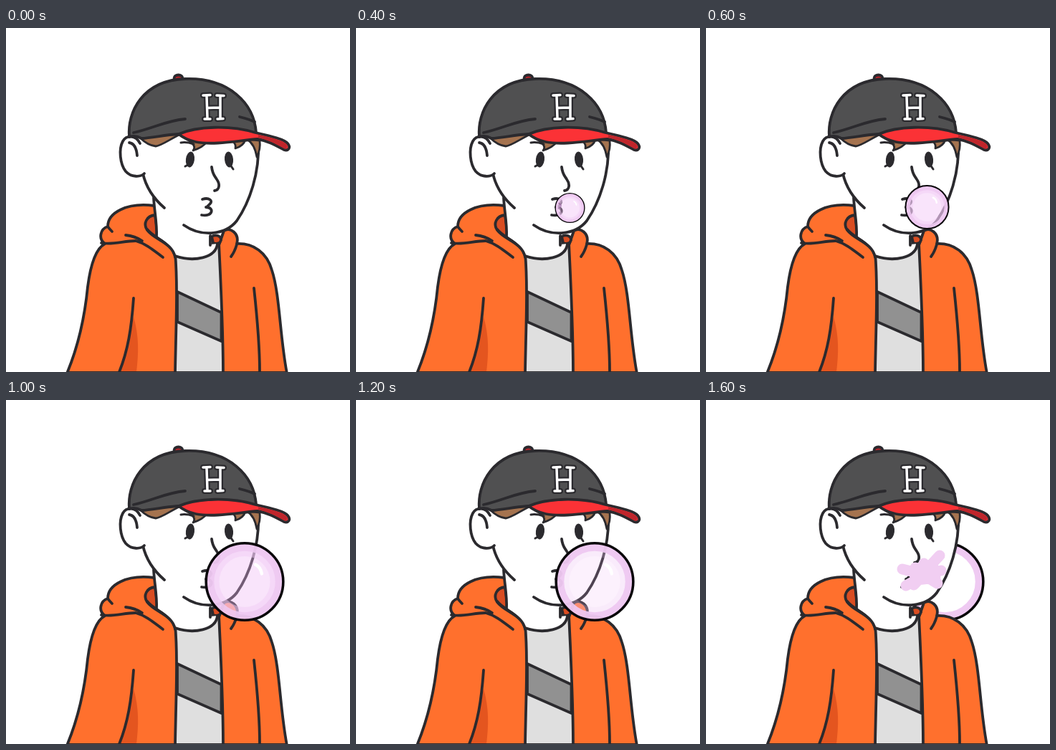
These frames come from a looping animation (480x480 px, 1.8 s). An HTML page:

```html
<!DOCTYPE html>
<html lang="en">
<head>
<meta charset="utf-8">
<title>Bubble gum</title>
<style>
  html, body { margin: 0; width: 100%; height: 100%; overflow: hidden; background: #fff; }
  svg { display: block; width: 100vw; height: 100vh; }
  .line { fill: none; }
  .ink { fill: #2b2a2e; stroke: none; }
  .orange { fill: #ff702d; }
  .rust { fill: #d94d22; }
  .hair { fill: #a5734f; stroke-width: 2.8; }
  .white { fill: #fff; }
  .flat { stroke: none; }
</style>
</head>
<body>
<svg viewBox="0 0 480 480" stroke="#2b2a2e" stroke-width="3.8" stroke-linecap="round" stroke-linejoin="round">
  <defs>
    <g id="ring">
      <circle r=".87" fill="none" stroke="#efc8f2" stroke-width=".2" stroke-opacity=".96"/>
      <circle r=".97" fill="none" stroke="#09070a" stroke-width=".064"/>
    </g>
    <path id="letter" d="M275 94L285 93.500M294 94L304 94.500M277 127L285 127M295 127L303 126.500M280 95L281 126M299 95L299 126M281 111.500L299 111"/>
  </defs>

  <use id="back" href="#ring"/>

  <!-- hoodie -->
  <path class="orange" d="M85 482C100 446 110 402 114 361C118 330 125 308 138 301C128 294 132 280 142 277C142 258 168 243 207 248L236 318L297 303L304 283C313 277 326 287 322 301C345 300 364 313 371 338C382 371 382 430 392 482Z"/>
  <path class="flat" d="M178 403C186 430 185 455 182 480H158C169 452 174 428 178 403Z" fill="#e4551f"/>
  <path class="line" d="M178 377C175 420 170 450 158 480M346 363C350 400 354 440 354 480"/>
  <path class="rust" d="M208 261C196 262 191 273 197 282C204 292 220 297 229 306L212 290Z"/>
  <path class="rust" d="M287 291C292 288 300 289 300 296L297 302L289 300Z"/>

  <!-- shirt -->
  <path d="M236 314C240 360 237 420 236 482H303C303 420 300 360 297 300Z" fill="#dfdfdf"/>
  <path d="M239 368L300.500 397V437L239 410Z" fill="#919191"/>

  <!-- neck -->
  <path class="white flat" d="M206 235L210 290C222 297 233 305 236 318C262 327 292 321 295 301L285 302V270Z"/>
  <path class="line" d="M206 237C207 256 211 273 210 291M285 290V303M236 318C262 327 293 321 295 301"/>
  <path class="line" d="M197 281C207 294 233 301 236 320M133 300C150 303 164 297 181 297C196 301 208 312 219 320M167 289C176 290 184 293 190 297M142 277C144 280 146 282 148 284M322 302C320 309 317 315 314 319"/>

  <!-- head -->
  <path class="white flat" d="M190 152L191 203C196 221 207 238 221 251L248 275C274 292 307 287 322 269C340 243 354 202 352 160L330 140Z"/>
  <path class="line" d="M191 203C195 221 206 238 221 251M352 160C354 202 340 243 322 269C307 288 274 293 248 275"/>
  <path class="white" d="M187 161C181 149 168 149 163 158C157 169 159 190 167 200C175 209 188 208 193 203"/>
  <path class="line" d="M172 160C179 161 182 167 183 178"/>

  <!-- hair -->
  <path class="hair" d="M188 154C202 151 225 147 242 149C229 155 217 164 209 165C200 164 194 160 188 154Z"/>
  <path class="hair" d="M246 151C257 158 267 164 261 171C270 168 276 165 280 159Z"/>
  <path class="hair" d="M316 158C320 161 321 164 320 168C327 166 332 162 334 156Z"/>
  <path class="hair" d="M336 155C344 160 348 168 350 180C354 172 355 165 354 157Z"/>
  <path class="line" d="M244 160C250 159 256 160 262 162" stroke-width="3"/>

  <!-- features -->
  <g class="ink">
    <ellipse cx="257" cy="183.500" rx="6" ry="11" transform="rotate(7 257 183)"/>
    <ellipse cx="311" cy="183.500" rx="6" ry="11" transform="rotate(-5 311 183)"/>
  </g>
  <path class="line" d="M256 190L250 193M313 191L317 197" stroke-width="3"/>
  <path class="line" d="M287 194C288 204 291 206 294 211C299 218 298 226 291 227"/>
  <path class="line" d="M274 239C283 236 290 241 284 246C282 248 280 250 279 250C291 250 289 264 273 261"/>

  <!-- cap -->
  <ellipse cx="240.500" cy="70" rx="6" ry="4.500" fill="#b5242b"/>
  <path d="M172 152C169 118 190 73 250 71C311 69 346 105 349 146L241 148C222 149 205 153 189 154Q180 149 172 152Z" fill="#505051"/>
  <path class="line" d="M178 146C205 140 224 129 250 127M326 124C334 126 341 128 347 131"/>
  <path d="M241 148C266 137 312 135 348 146C370 151 388 155 393 161C398 167 394 172 388 170C375 163 364 157 351 155C325 157 290 164 265 159C255 157 247 153 241 148Z" fill="#fb3236"/>
  <path class="flat" d="M352 149C370 153 386 157 391 162C394 166 392 169 388 168C376 161 366 156 352 153Z" fill="#c0262c"/>
  <g class="line">
    <use href="#letter" stroke-width="8"/>
    <use href="#letter" stroke="#fff" stroke-width="3.500"/>
  </g>

  <!-- gum -->
  <g id="bubble">
    <g id="film" stroke="none">
      <circle r=".78" fill="#edb4f3" fill-opacity=".36"/>
      <circle r=".71" fill="none" stroke="#f1cdf5" stroke-width=".14" stroke-opacity=".5"/>
      <path d="M.27-.43Q.4-.37.43-.2" fill="none" stroke="#fff" stroke-width=".08"/>
    </g>
    <use href="#ring"/>
    <path id="lip" d="M-.72-.3Q-.48-.18-.7 0" fill="none" stroke="#94609b" stroke-width=".1" stroke-opacity=".6"/>
  </g>
  <path id="splat" d="M274 236L302 243L292 234M302 243L326 217M304 228L302 243L328 238M302 243L323 256M304 243L290 258M302 246L279 259M290 241L316 229L320 248L294 251Z" fill="#f1cef2" stroke="#f1cef2" stroke-width="15"/>
  <path class="line" d="M86 480H391" stroke-width="2"/>
</svg>
<script>
  const STEP = 200;
  // radius, centre y, film opacity, popped
  const poses = [
    [0, 251, 0, 0], [11, 251, 1, 0], [21, 251, 1, 0],
    [31, 250, 1, 0], [41, 249.5, 1, 0], [55.5, 253.5, 1, 0],
    [55.5, 253.5, .5, 0], [55.5, 253.5, 0, 0], [55.5, 253.5, 0, 1]
  ];
  const el = id => document.getElementById(id);
  const show = (node, on) => node.setAttribute('visibility', on ? 'visible' : 'hidden');
  const [back, bubble, film, lip, splat] = ['back', 'bubble', 'film', 'lip', 'splat'].map(el);

  function draw() {
    const [r, y, clear, popped] = poses[Math.floor(performance.now() / STEP) % poses.length];
    const place = `translate(${277.5 + r} ${y}) scale(${r})`;
    back.setAttribute('transform', place);
    bubble.setAttribute('transform', place);
    film.setAttribute('opacity', clear);
    show(back, popped);
    show(bubble, r && !popped);
    show(lip, r && r < 30 && !popped);
    show(splat, popped);
    requestAnimationFrame(draw);
  }
  draw();
</script>
</body>
</html>
```
